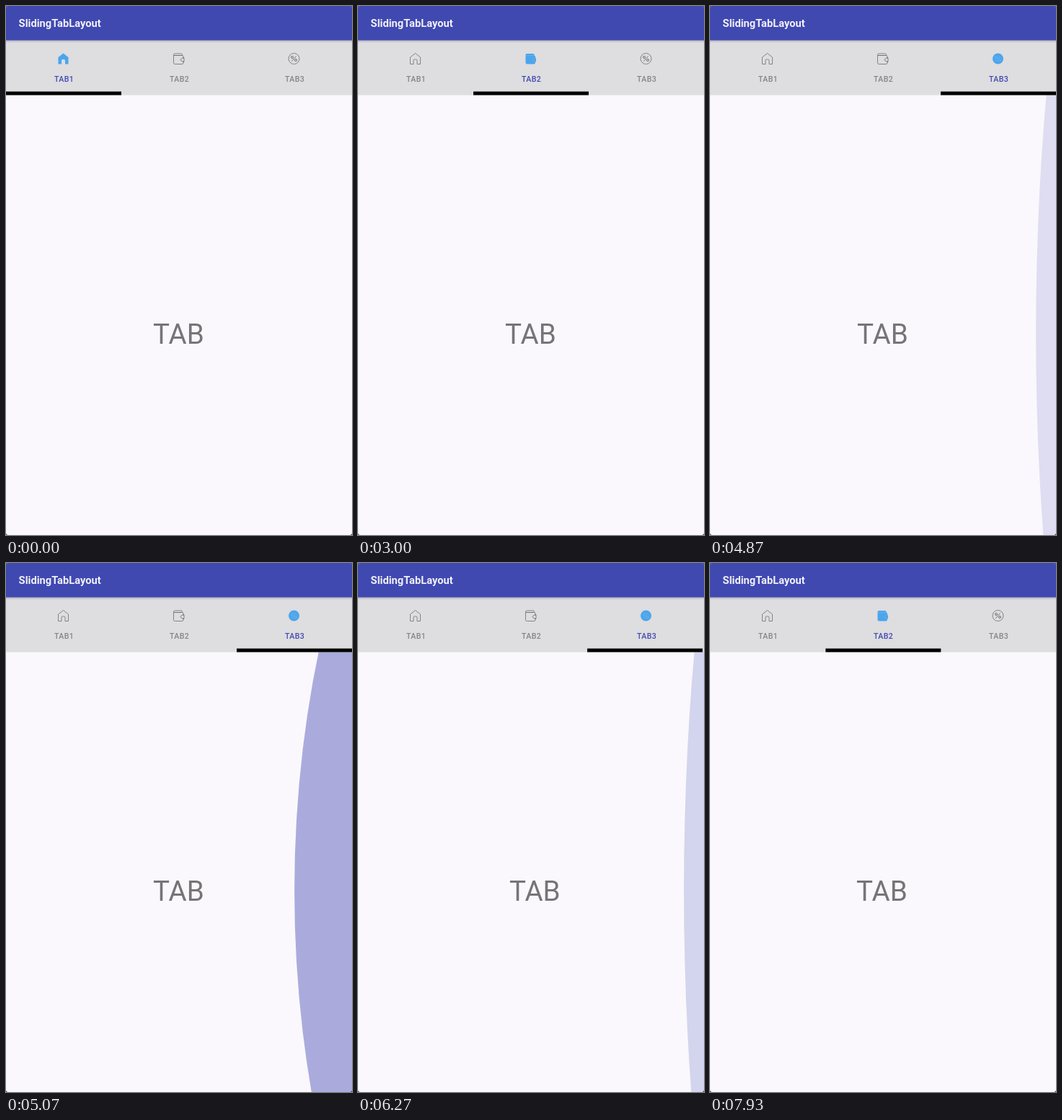
An HTML page with a canvas for the animation above (8 s loop, 480 by 733 pixels).

```html
<!DOCTYPE html>
<html lang="en">
<head>
<meta charset="utf-8">
<title>SlidingTabLayout</title>
<style>
  html, body { margin: 0; width: 100%; height: 100%; overflow: hidden; background: #25262c; }
  canvas { display: block; }
</style>
</head>
<body>
<canvas id="stage" width="480" height="733"></canvas>
<script>
const ctx = document.getElementById('stage').getContext('2d');
const LOOP = 8000, W = 480, H = 733, TAB_W = 160, BAR_BOTTOM = 123.5;
const INDIGO = '#4049b0', BLUE = '#4ba5ec', GREY = '#858588', PAGE = '#faf8fc', BAR = '#dedddf';

const linear = p => p;
const settle = p => 1 - (1 - p) ** 5;

// Page position: [start, end, from, to, easing]
const moves = [
  [1020, 1180, 0, .32, linear], [1180, 1780, .32, 1, settle],
  [2540, 2740, 1, .78, linear], [2740, 3000, .78, 1, settle],
  [3400, 3530, 1, 1.47, linear], [3610, 3800, 1.47, 1.55, linear], [3800, 4400, 1.55, 2, settle],
  [5930, 6070, 2, 1.906, linear], [6070, 6670, 1.906, 2, settle],
  [6540, 6680, 2, 1.7, linear], [6680, 7280, 1.7, 1, settle],
  [7470, 7680, 1, 1.47, linear], [7680, 8060, 1.47, 1, settle],
];
// Selected tab: [time, index]
const selections = [[0, 0], [1180, 1], [3800, 2], [6680, 1]];
// Overscroll glow: [pull start, release, depth, alpha]
const glows = [[4810, 5080, 80, .435], [5670, 6070, 63, .47]];

function position(t) {
  let value = 0;
  for (const [start, end, from, to, ease] of moves) {
    if (t >= start) value = from + (to - from) * ease(Math.min(1, (t - start) / (end - start)));
  }
  return value;
}

function text(label, x, y, font, color, align = 'center', spacing = 0) {
  ctx.font = font + ' Roboto, sans-serif';
  ctx.letterSpacing = spacing + 'px';
  ctx.fillStyle = color;
  ctx.textAlign = align;
  ctx.fillText(label, x, y);
}

function rect(x, y, w, h, color) {
  ctx.fillStyle = color;
  ctx.fillRect(x, y, w, h);
}

function stroke(d, color, width) {
  ctx.strokeStyle = color;
  ctx.lineWidth = width;
  ctx.stroke(new Path2D(d));
}

// Icons are drawn around their own centre.
const icons = [
  {
    shape: 'M-7 -2L0 -7.5L7 -2V7.5H2.5V2.5Q2.5 1 1 1H-1Q-2.5 1 -2.5 2.5V7.5H-7Z',
    detail: '',
  },
  {
    shape: 'M-7 -5Q-7 -7 -5 -7H3.5Q5 -7 5 -5.5V-4.5Q6.5 -4.5 6.5 -3V-1H7.5V4H6.5V5.5Q6.5 7.5 4.5 7.5H-5Q-7 7.5 -7 5.5Z',
    detail: 'M-6.5 -4.5H5M7.5 -1H5L2.5 1.5L5 4H7.5',
  },
  {
    shape: 'M7.5 0A7.5 7.5 0 1 1 -7.5 0A7.5 7.5 0 1 1 7.5 0Z',
    detail: 'M3 -3.5L-3 3.5M-1 -2A1.5 1.5 0 1 1 -4 -2A1.5 1.5 0 1 1 -1 -2M4 2A1.5 1.5 0 1 1 1 2A1.5 1.5 0 1 1 4 2',
  },
];

function drawIcon(index, selected) {
  const { shape, detail } = icons[index];
  ctx.save();
  ctx.translate(79.5 + index * TAB_W, 73);
  if (selected) {
    ctx.fillStyle = BLUE;
    ctx.fill(new Path2D(shape));
    stroke(detail, '#76b4e6', .7);
  } else {
    stroke(shape, '#6c6c6f', .8);
    stroke(detail, '#555558', .8);
  }
  ctx.restore();
}

function drawGlow(t) {
  for (const [start, release, maxDepth, alpha] of glows) {
    if (t < start || t > release + 600) continue;
    const amount = t < release
      ? Math.sin(Math.PI / 2 * (t - start) / (release - start))
      : (1 - (t - release) / 600) ** 2;
    const depth = maxDepth * amount, rx = 74 + 6.54 * depth;
    ctx.globalAlpha = alpha * amount;
    ctx.fillStyle = INDIGO;
    ctx.beginPath();
    ctx.ellipse(W - depth + rx, 454, rx, 1000, 0, 0, 2 * Math.PI);
    ctx.fill();
    ctx.globalAlpha = 1;
  }
}

function draw(t) {
  const pos = position(t);
  const selected = selections.filter(([time]) => t >= time).pop()[1];

  ctx.clearRect(0, 0, W, H);
  ctx.save();
  ctx.beginPath();
  ctx.roundRect(0, 0, W, H, 3);
  ctx.clip();

  rect(0, 0, W, H, PAGE);
  for (let i = 0; i < 3; i++) text('TAB', 239.4 + (i - pos) * W, 468, '38.6px', '#757578');
  drawGlow(t);

  rect(0, 47, W, BAR_BOTTOM - 47, BAR);
  for (let i = 0; i < 3; i++) {
    drawIcon(i, i === selected);
    text('TAB' + (i + 1), 80.7 + i * TAB_W, 104.5, '500 10.6px', i === selected ? INDIGO : GREY, 'center', .4);
  }
  rect(pos * TAB_W, 118.5, TAB_W, BAR_BOTTOM - 118.5, '#000');

  rect(0, 0, W, 47.6, INDIGO);
  const shadow = ctx.createLinearGradient(0, 47.6, 0, 51);
  shadow.addColorStop(0, 'rgba(60,60,90,.25)');
  shadow.addColorStop(1, 'rgba(60,60,90,0)');
  rect(0, 47.6, W, 3.4, shadow);
  text('SlidingTabLayout', 17.6, 28.5, '700 14.7px', '#f0f0fa', 'left');
  ctx.restore();
}

const begin = performance.now();
function tick() {
  draw((performance.now() - begin) % LOOP);
  requestAnimationFrame(tick);
}
tick();
</script>
</body>
</html>
```
